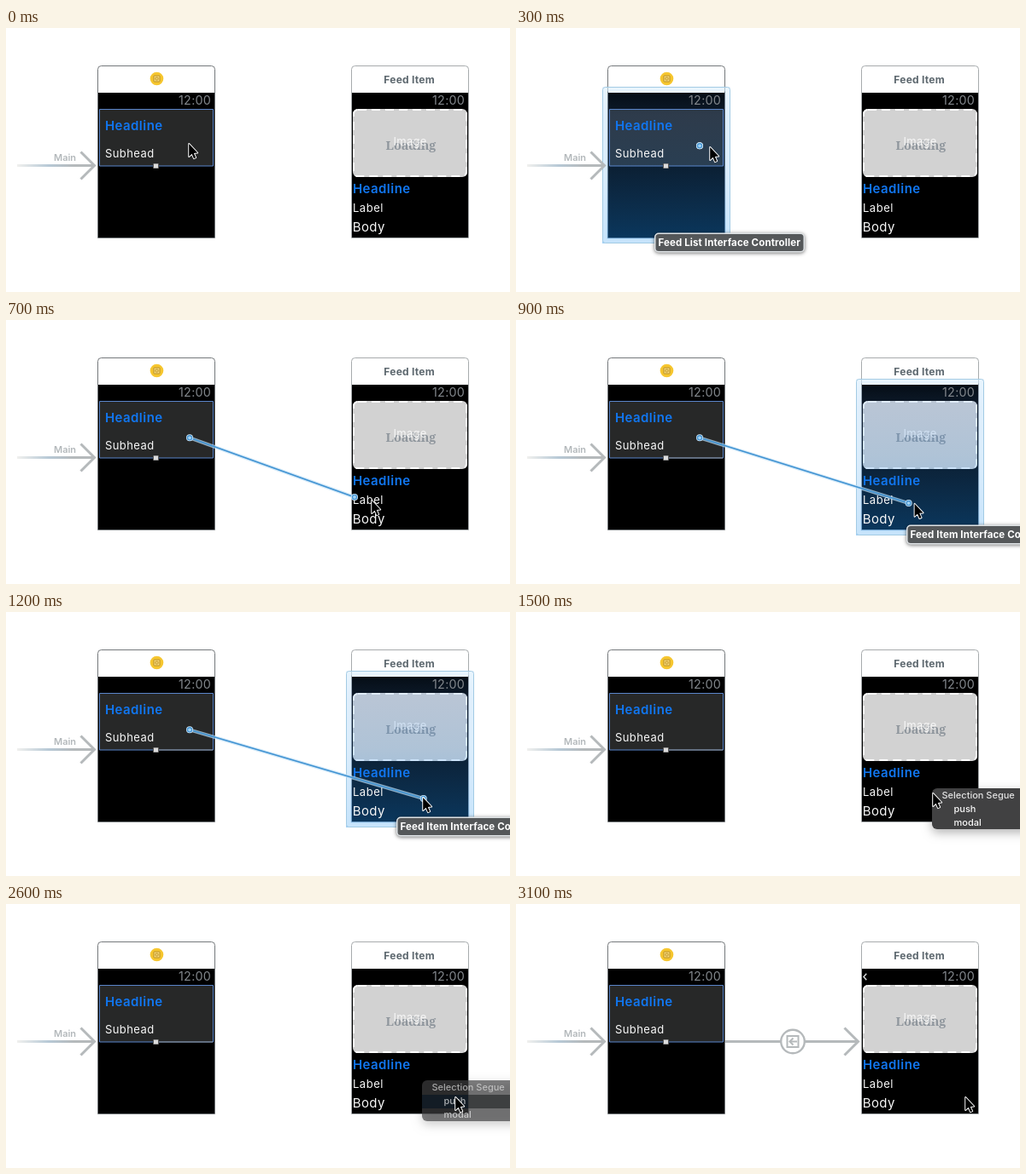
Recreate the animation shown at these times as an HTML page with a canvas. Size 590 px wide and 310 px high, loop 3500 ms.

```html
<!DOCTYPE html>
<html lang="en">
<head>
<meta charset="utf-8">
<title>Connecting two screens</title>
<style>
html, body { margin: 0; width: 100%; height: 100%; overflow: hidden; background: #fff; }
canvas { display: block; width: 590px; height: 310px; }
</style>
</head>
<body>
<canvas id="stage" width="590" height="310"></canvas>
<script>
const LOOP = 3500;
const STEP = 100;
const canvas = document.getElementById('stage');
const ratio = window.devicePixelRatio || 1;
canvas.width = 590 * ratio;
canvas.height = 310 * ratio;
const c = canvas.getContext('2d');
c.scale(ratio, ratio);

const SANS = 'Inter, "Open Sans", sans-serif';
const SERIF = '"Noto Serif", serif';
const GRAY = '#b5b9bb';
const BLUE = '#1177f2';
const INK = '#f8f8f8';
const LIST_X = 107;
const ITEM_X = 404;
const DRAG_FROM = [215, 138.3];
const DROP = [488, 218];

const during = (t, from, to) => t >= from && t < to;
const span = (t, from, to) => Math.min(1, Math.max(0, (t - from) / (to - from)));
const easeOut = p => 1 - (1 - p) ** 2;
const mix = (a, b, p) => a.map((v, i) => v + (b[i] - v) * p);

// Steady pull across the gap, then a slowing approach
function glide(t, from, mid, to) {
  return t < 700
    ? mix(from, mid, span(t, 300, 700))
    : mix(mid, to, easeOut(span(t, 700, 1200)));
}

function pointer(t) {
  if (t < 300) return [214, 136];
  if (t < 1200) return glide(t, [227, 140], [428, 212], DROP);
  const rest = mix(DROP, [488, 213], span(t, 1200, 1500));
  return mix(rest, [526, 227], span(t, 1900, 2100));
}

const dragEnd = t => glide(t, DRAG_FROM, [408, 208], [488.7, 219]);

function fill(x, y, w, h, color) {
  c.fillStyle = color;
  c.fillRect(x, y, w, h);
}

function outline(color, width) {
  c.strokeStyle = color;
  c.lineWidth = width;
  c.stroke();
}

function box(x, y, w, h, r) {
  c.beginPath();
  c.roundRect(x, y, w, h, r);
}

function line(points, color, width, close) {
  c.beginPath();
  points.forEach(([x, y]) => c.lineTo(x, y));
  if (close) c.closePath();
  outline(color, width);
}

function text(str, x, y, size, weight, color, spacing = 0, family = SANS) {
  c.font = `${weight} ${size}px ${family}`;
  c.letterSpacing = spacing + 'px';
  c.fillStyle = color;
  c.fillText(str, x, y);
}

function disc(x, y, r, color) {
  c.beginPath();
  c.arc(x, y, r, 0, Math.PI * 2);
  c.fillStyle = color;
  c.fill();
}

function shadowFill(color, shade, blur, dy) {
  c.save();
  c.shadowColor = shade;
  c.shadowBlur = blur * ratio;
  c.shadowOffsetY = dy * ratio;
  c.fillStyle = color;
  c.fill();
  c.restore();
}

function screen(x, edge) {
  box(x + 0.5, 44.5, 137, 202, [4, 4, 0, 0]);
  c.fillStyle = '#fff';
  c.fill();
  outline(edge, 1);
  fill(x + 1, 76, 136, 170, '#000');
}

function clock(x) {
  text('12:00', x + 95, 89.5, 14.3, 400, '#82878c', 0.3);
}

function listScreen() {
  screen(LIST_X, '#74787b');
  disc(176.5, 59.5, 7.8, '#f6c62f');
  for (const side of [7, 3]) {
    box(176.5 - side / 2, 59.5 - side / 2, side, side, 0.5);
    c.fillStyle = '#fbdc7c';
    c.fill();
    outline('#b98f24', 1);
  }
  fill(109, 96, 134, 66, '#272828');
}

function listLabels(t) {
  clock(LIST_X);
  text('Headline', 115.9, 120, 15, 600, BLUE, 0.45);
  text('Subhead', 115.9, 152, 13, 400, INK, 0.45);
  box(109.5, 95.5, 133, 66.5, 0);
  outline('#5b86cb', 1);
  if (during(t, 800, 3000)) line([[176, 162], [242, 162]], '#8b8d8f', 1);
  fill(172, 159, 7, 6, '#555');
  fill(173, 159.5, 5, 5, '#dcdcdc');
}

function itemScreen() {
  screen(ITEM_X, '#a7abad');
  text('Feed Item', 442.3, 65, 12, 700, '#5c676e', 0.25);
  box(406, 95, 134, 80, 6);
  c.fillStyle = '#d2d2d2';
  c.fill();
  box(407, 96, 132, 78, 5);
  c.setLineDash([10, 6]);
  outline('#fff', 2);
  c.setLineDash([]);
  text('Loading', 444.5, 143, 14.4, 700, '#8f969d', 0, SERIF);
  text('Image', 453.5, 138, 13, 400, '#f6f6f6', 0.3);
}

function itemLabels(t) {
  clock(ITEM_X);
  text('Headline', 405.9, 194, 15, 600, BLUE, 0.45);
  text('Label', 405.9, 216, 13, 400, INK, 0.55);
  text('Body', 405.7, 239, 15, 400, INK, 0.4);
  if (t >= 3000) line([[410.3, 81.8], [407, 85.5], [410.3, 89.2]], '#d4d7d9', 1.5);
}

function arrow(from, tip, color) {
  line([[from, 161.5], [tip, 161.5]], color, 3);
  line([[tip - 16, 145.5], [tip, 161.5], [tip - 16, 177.5]], GRAY, 3);
}

function entryArrow() {
  const fade = c.createLinearGradient(13, 0, 80, 0);
  fade.addColorStop(0, '#f0f0ee');
  fade.addColorStop(0.55, '#b7c9d6');
  fade.addColorStop(1, GRAY);
  arrow(13, 103.5, fade);
  text('Main', 56, 156, 11, 600, '#b3b8bb');
}

function segue() {
  arrow(245, 400.5, GRAY);
  disc(324, 161.5, 15, GRAY);
  disc(324, 161.5, 12.6, '#fff');
  box(317.5, 155, 13, 13, 0);
  outline(GRAY, 2);
  line([[329, 161.5], [320.5, 161.5]], GRAY, 2);
  line([[324.5, 157.5], [320.5, 161.5], [324.5, 165.5]], GRAY, 2);
}

function glow(screenX) {
  const x = screenX - 6;
  const tint = c.createLinearGradient(0, 69, 0, 252);
  tint.addColorStop(0, 'rgba(50,142,232,0.07)');
  tint.addColorStop(0.18, 'rgba(75,142,228,0.19)');
  tint.addColorStop(0.5, 'rgba(50,142,232,0.22)');
  tint.addColorStop(1, 'rgba(25,140,238,0.4)');
  fill(x, 69, 150, 184, tint);
  box(x + 3, 72, 144, 178, 1);
  outline('rgba(228,244,255,0.55)', 5);
  box(x + 0.5, 69.5, 149, 183, 3);
  outline('#a3cbe4', 1);
}

function tooltip(str, x, width) {
  box(x - 0.5, 240.5, width + 1, 23, 5);
  shadowFill('#dfe3e6', 'rgba(0,0,0,0.55)', 4, 1);
  box(x + 1, 242, width - 2, 20, 3.5);
  c.fillStyle = '#55585a';
  c.fill();
  text(str, x + 4, 256.3, 11.5, 700, '#fff', 0.12);
}

function dot([x, y]) {
  disc(x, y, 4, '#d6ecfa');
  disc(x, y, 3.2, '#4493d2');
  disc(x, y, 1.9, '#a3d3f3');
}

function dragLine(t) {
  const end = dragEnd(t);
  line([DRAG_FROM, end], 'rgba(190,222,246,0.7)', 4);
  line([DRAG_FROM, end], '#3f92d2', 1.6);
  dot(DRAG_FROM);
  dot(end);
}

function menu(t) {
  c.globalAlpha = 1 - span(t, 2500, 2800);
  box(487, 207, 125, 48, 6);
  shadowFill('#414142', 'rgba(0,0,0,0.3)', 12, 4);
  if (t >= 2100 && !during(t, 2400, 2500)) {
    fill(487, 224, 54, 16, '#081521');
    fill(541, 224, 49, 16, '#242729');
  }
  text('Selection Segue', 498.5, 219, 11, 500, '#e2e2e2');
  text('push', 512.5, 235, 11, 500, INK);
  text('modal', 512.5, 251, 11, 500, INK);
  c.globalAlpha = 1;
}

function cursor([x, y]) {
  const shape = [[0, 0], [0, 15], [3.4, 11.8], [5.8, 17.2], [8, 16.2],
    [5.6, 11], [10, 10.6]].map(([dx, dy]) => [x + 0.2 + dx, y + dy]);
  c.lineJoin = 'round';
  line(shape, '#fff', 1.9, true);
  c.fillStyle = '#000';
  c.fill();
  c.lineJoin = 'miter';
}

function draw(t) {
  const overList = during(t, 300, 400);
  const overItem = during(t, 800, 1500);
  fill(0, 0, 590, 310, '#fff');
  listScreen();
  itemScreen();
  if (overList) glow(LIST_X);
  if (overItem) glow(ITEM_X);
  listLabels(t);
  itemLabels(t);
  entryArrow();
  if (t >= 3000) segue();
  if (overList) tooltip('Feed List Interface Controller', 162.5, 175);
  if (overItem) tooltip('Feed Item Interface Controller', 457.5, 180);
  if (during(t, 300, 1500)) dragLine(t);
  if (during(t, 1500, 2800)) menu(t);
  cursor(pointer(t));
}

const start = performance.now();
function tick() {
  const t = (performance.now() - start) % LOOP;
  draw(Math.floor(t / STEP) * STEP);
  requestAnimationFrame(tick);
}
tick();
</script>
</body>
</html>
```
